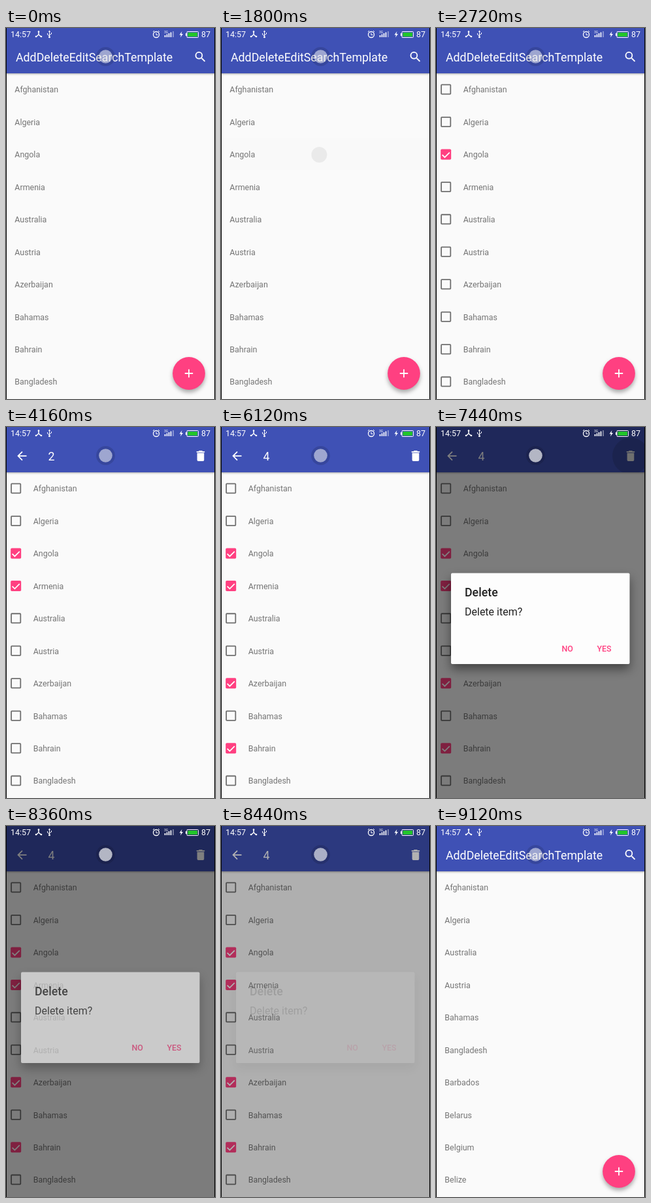
These frames come from a looping animation (320 px wide and 565 px high, 9.16 s). An HTML page:

```html
<!DOCTYPE html>
<html lang="en">
<head>
<meta charset="utf-8">
<title>List with multi-select delete</title>
<style>
  html, body { margin: 0; width: 100%; height: 100%; overflow: hidden; background: #000; }
  svg { display: block; width: 100%; height: 100%; font: 12.44px Roboto, sans-serif; }
  .title { font-size: 17.78px; }
  .button { font-weight: 500; fill: #ff4081; }
  #bar { filter: drop-shadow(0 1.5px 1.5px rgba(0, 0, 0, .35)); }
  #fab circle { filter: drop-shadow(0 4px 3px rgba(0, 0, 0, .32)); }
  #dialog > rect { filter: drop-shadow(0 8px 8px rgba(0, 0, 0, .45)); }
</style>
</head>
<body>
<svg viewBox="0 0 320 565" preserveAspectRatio="none">
  <defs>
    <path id="search" d="M15.5 14h-.8l-.3-.3A6.5 6.5 0 1 0 13.7 14.4l.3.3v.8l5 5 1.5-1.5zM9.5 14a4.5 4.5 0 1 1 0-9 4.5 4.5 0 0 1 0 9z"/>
    <path id="back" d="M20 11H7.8l5.6-5.6L12 4l-8 8 8 8 1.4-1.4L7.8 13H20z"/>
    <path id="trash" d="M6 19a2 2 0 0 0 2 2h8a2 2 0 0 0 2-2V7H6zM19 4h-3.5l-1-1h-5l-1 1H5v2h14z"/>
    <path id="pencil" d="M3 17.2V21h3.8L17.8 9.9l-3.7-3.7zM20.7 7a1 1 0 0 0 0-1.4l-2.3-2.3a1 1 0 0 0-1.4 0l-1.9 1.8 3.8 3.8z"/>
    <path id="off" fill="#6f6f6f" d="M19 5v14H5V5zm0-2H5a2 2 0 0 0-2 2v14a2 2 0 0 0 2 2h14a2 2 0 0 0 2-2V5a2 2 0 0 0-2-2z"/>
    <g id="on">
      <rect x="3" y="3" width="18" height="18" rx="2" fill="#ff4081"/>
      <path d="M5.7 12.7l4.3 4.3 8.3-8.3" fill="none" stroke="#fff" stroke-width="2"/>
    </g>
    <clipPath id="pressed"><rect y="168" width="320" height="49.5"/></clipPath>
    <clipPath id="barClip"><rect width="320" height="69"/></clipPath>
  </defs>

  <rect width="320" height="565" fill="#fafafa"/>
  <g clip-path="url(#pressed)">
    <rect id="rowTint" y="168" width="320" height="50"/>
    <circle id="rowRipple" cy="193" opacity=".06"/>
  </g>
  <g id="list" fill="#757575"></g>

  <rect id="bar" width="320" height="69" fill="#3f51b5"/>
  <g id="normal" fill="#fff">
    <text class="title" x="15" y="51">AddDeleteEditSearchTemplate</text>
    <use href="#search" transform="translate(287 33.4) scale(.889)"/>
  </g>
  <g id="action" fill="#fff">
    <use href="#back" transform="translate(13.7 33.4) scale(.889)"/>
    <text id="count" class="title" x="64.5" y="51"></text>
    <use id="bin" href="#trash"/>
    <use id="edit" href="#pencil" transform="translate(287.3 33.4) scale(.889)"/>
  </g>
  <g clip-path="url(#barClip)"><circle id="binRipple" cx="298" cy="44"/></g>

  <g id="fab">
    <circle r="24.9" fill="#ff4081"/>
    <path d="M-6.2 0H6.2M0-6.2V6.2" stroke="#fff" stroke-width="1.8"/>
  </g>

  <rect id="dim" width="320" height="565"/>
  <g id="dialog">
    <rect x="23" y="222.5" width="273.5" height="138.5" rx="2" fill="#fdfdfd"/>
    <text class="title" x="44" y="258" font-weight="500" fill="#212121">Delete</text>
    <text x="44" y="287" font-size="16" fill="#212121">Delete item?</text>
    <text class="button" x="192.5" y="341.5">NO</text>
    <text class="button" x="246.5" y="341.5">YES</text>
  </g>

  <g fill="#fff">
    <text x="7" y="14">14:57</text>
    <g stroke="#fff" fill="none">
      <path d="M50 5v5l-4 3.500M50 10l4 3.500" stroke-width="1.5"/>
      <path d="M66.500 5v9M63.500 8v2l3 2M69.500 7v2l-3 2"/>
      <circle cx="230" cy="10" r="4.500" stroke-width="1.300"/>
      <path d="M230 7.500V10.500h2.500M225 6l2-2M235 6l-2-2"/>
      <path d="M243.500 14v-3M246.500 14v-4.500M249.500 14V8M252.500 14V6.500" stroke-width="1.700"/>
      <path d="M256 14V5" stroke-opacity=".5" stroke-width="1.500"/>
    </g>
    <circle cx="50" cy="5.500" r="1.300"/><circle cx="46" cy="13" r="1.300"/><circle cx="54" cy="13" r="1.300"/>
    <path d="M64.800 6L66.500 3.500 68.200 6z"/><circle cx="66.500" cy="13.800" r="1.500"/>
    <text x="242" y="8" font-size="5">3G</text>
    <path d="M269.500 5l-4 5.500h2.500l-1 4 4-5.500h-2.500z"/>
    <rect x="275" y="8" width="2" height="4"/>
    <rect x="277" y="5.500" width="17.500" height="9" rx="1" fill="none" stroke="#fff"/>
    <rect x="278.500" y="7" width="14.500" height="6" fill="#22c52b"/>
    <text x="299" y="14">87</text>
    <circle cx="152.500" cy="43.500" r="14.500" fill="#000" opacity=".13"/>
    <circle id="ball" cx="152.500" cy="43.500" r="10.300"/>
  </g>
  <path d="M.5 0V565M319.500 0V565" stroke="#000"/>
</svg>

<script>
const LOOP = 9160, STEP = 40, ROWS = 10, PITCH = 49.45;
const SELECT = 2720, DELETED = 8800, CLOSE = 8360;
const names = ("Afghanistan Algeria Angola Armenia Australia Austria Azerbaijan Bahamas " +
  "Bahrain Bangladesh Barbados Belarus Belgium Belize").split(" ");
const checkedAt = { Angola: SELECT, Armenia: 4000, Azerbaijan: 5080, Bahrain: 6120 };

const $ = id => document.getElementById(id);
const set = (id, attrs) => {
  for (const key in attrs) $(id).setAttribute(key, attrs[key]);
};
const ramp = (t, start, length) => Math.min(1, Math.max(0, (t - start) / length));
const easeOut = u => 1 - (1 - u) ** 2;
const smooth = u => u * u * (3 - 2 * u);

const add = (tag, attrs) => {
  const node = document.createElementNS("http://www.w3.org/2000/svg", tag);
  for (const key in attrs) node.setAttribute(key, attrs[key]);
  return $("list").appendChild(node);
};
const rows = Array.from({ length: ROWS }, (_, i) => ({
  label: add("text", { y: 98.4 + PITCH * i }),
  box: add("use", { transform: `translate(4.5 ${82.9 + PITCH * i}) scale(.889)` })
}));

function drawList(t) {
  const selecting = t >= SELECT && t < DELETED;
  const shown = t < DELETED ? names : names.filter(name => !checkedAt[name]);
  rows.forEach(({ label, box }, i) => {
    label.textContent = shown[i];
    label.setAttribute("x", selecting ? 41.7 : 13.3);
    box.setAttribute("href", t >= checkedAt[shown[i]] ? "#on" : "#off");
    box.setAttribute("visibility", selecting ? "visible" : "hidden");
  });

  // Held press on the third row
  const held = t >= 1800 && t < SELECT;
  const press = held ? ramp(t, 1780, 540) : 0;
  set("rowTint", { opacity: .06 * press });
  set("rowRipple", { cx: 150 + 10 * press, r: 165 * easeOut(press) });
}

function drawBar(t) {
  const mode = t < DELETED ? easeOut(ramp(t, SELECT, 320)) : 1 - easeOut(ramp(t, DELETED, 320));
  const single = t < checkedAt.Armenia;
  set("normal", { opacity: 1 - mode });
  set("action", { opacity: mode });
  $("count").textContent = Object.values(checkedAt).filter(at => t >= at).length || "";
  set("bin", { transform: `translate(${single ? 244.6 : 287.3} 33.4) scale(.889)` });
  set("edit", { visibility: single ? "visible" : "hidden" });

  const tap = t < 7160 ? 0 : ramp(t, 7140, 260);
  set("binRipple", { r: 28 * easeOut(tap), opacity: .14 * (1 - ramp(t, 7420, 220)) });
}

function drawFab(t) {
  const size = t < DELETED ? 1 - ramp(t, SELECT, 240) ** 2 : smooth(ramp(t, DELETED, 280));
  set("fab", { transform: `translate(280 526) scale(${size})`, opacity: size });
}

function drawDialog(t) {
  const dim = .5 * (ramp(t, 7240, 200) - ramp(t, CLOSE, 200));
  const enter = easeOut(ramp(t, 7240, 200));
  const leave = t < CLOSE ? 1 : (1 - ramp(t, 8320, 180)) ** 2;
  const scale = .9 + .1 * enter;
  set("dim", { opacity: dim });
  set("dialog", {
    opacity: enter * leave,
    transform: `translate(160 292) scale(${scale}) translate(-160 -292)`
  });
  set("ball", { opacity: .52 + .3 * dim });
}

function frame(now) {
  const t = Math.floor(now % LOOP / STEP) * STEP;
  drawList(t);
  drawBar(t);
  drawFab(t);
  drawDialog(t);
  requestAnimationFrame(frame);
}
frame(0);
</script>
</body>
</html>
```
